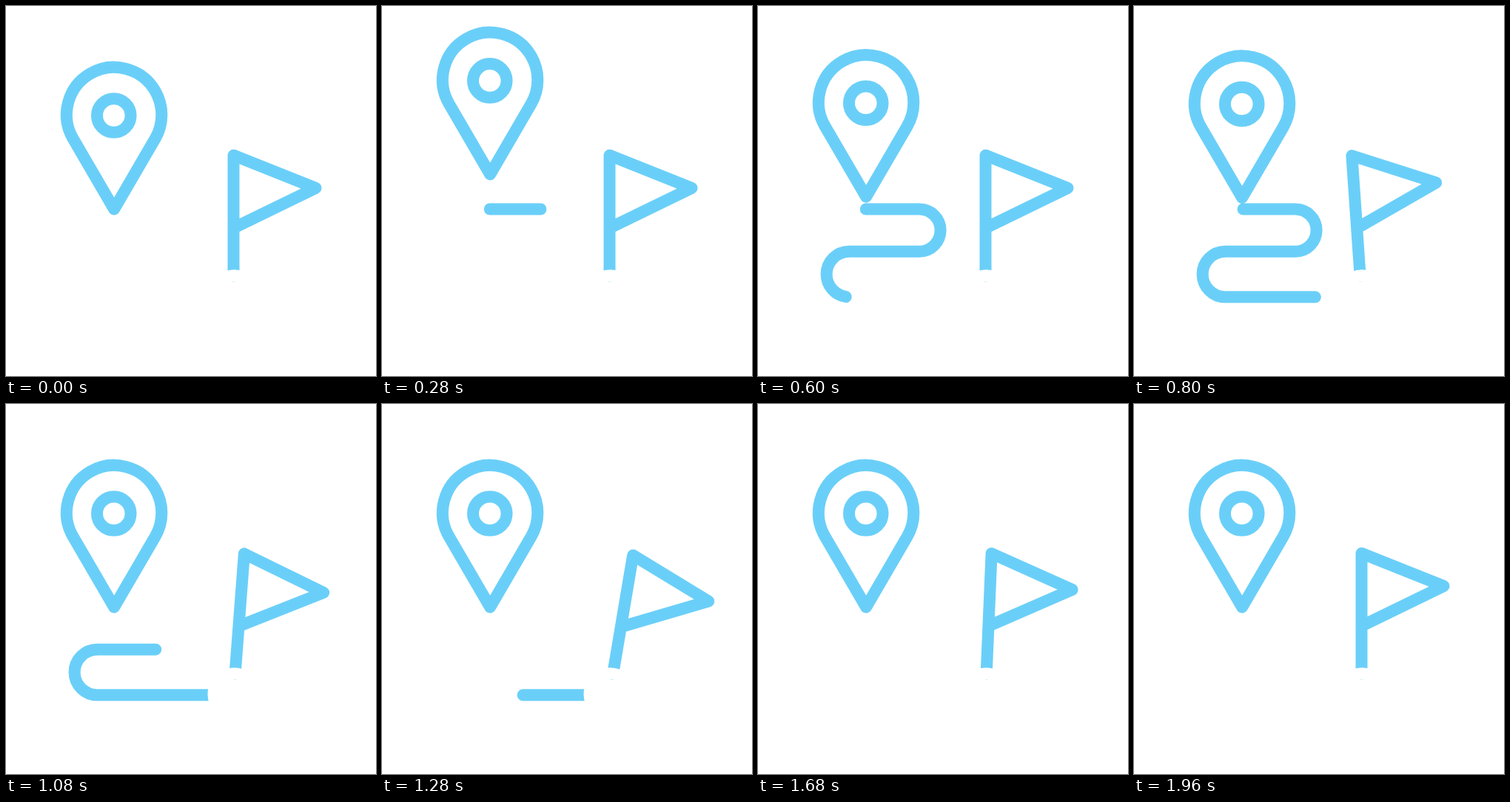
Write an HTML page with a canvas that moves like this. It is 500 px wide and 500 px high and loops after 5 s.

```html
<!DOCTYPE html>
<html lang="en">
<head>
<meta charset="utf-8">
<title>Route</title>
<style>
  html, body { margin: 0; width: 100%; height: 100%; overflow: hidden; background: #fff; }
  canvas { display: block; width: 500px; height: 500px; }
</style>
</head>
<body>
<canvas id="stage"></canvas>
<script>
const LOOP = 5000, STEP = 40, LAST = 1960;
const BLUE = '#6acff8', WHITE = '#fff';
const canvas = document.getElementById('stage');
const ctx = canvas.getContext('2d');
const scale = window.devicePixelRatio || 1;
canvas.width = canvas.height = 500 * scale;

// Cubic easing through (0,0) and (1,1), solved by bisection.
function bezier(x1, y1, x2, y2) {
  const at = (p, a, b) => 3 * p * (1 - p) * ((1 - p) * a + p * b) + p * p * p;
  return u => {
    if (u <= 0) return 0;
    if (u >= 1) return 1;
    let lo = 0, hi = 1;
    for (let i = 0; i < 30; i++) {
      const mid = (lo + hi) / 2;
      if (at(mid, x1, x2) < u) lo = mid; else hi = mid;
    }
    return at(lo, y1, y2);
  };
}
const smooth = bezier(0.5, 0, 0.5, 1);
const drop = bezier(0.5, 0, 1, 1);

// Keys are [time, value, easing into this key].
function track(keys, t) {
  if (t <= keys[0][0]) return keys[0][1];
  for (let i = 1; i < keys.length; i++) {
    const [t0, v0] = keys[i - 1];
    const [t1, v1, ease = smooth] = keys[i];
    if (t < t1) return v0 + (v1 - v0) * ease((t - t0) / (t1 - t0));
  }
  return keys[keys.length - 1][1];
}

const HOP = [[0, 0], [333, -49], [667, 0, drop], [833, -16.5], [1000, 0, drop]];
const SWING = [[667, 0], [933, -7.9], [1200, 12.5], [1467, -5.8], [1733, 3], [LAST, 0]];
const HEAD = [[0, 0], [1007, 1]];
const TAIL = [[762, 0], [1515, 1]];

// Pin: a circle with tangents meeting at the tip.
const pin = new Path2D();
const PIN = { x: 146.1, y: 147, r: 64.2, tip: 274.5 };
const lean = Math.asin(PIN.r / (PIN.tip - PIN.y));
pin.moveTo(PIN.x, PIN.tip);
pin.arc(PIN.x, PIN.y, PIN.r, Math.PI - lean, lean);
pin.closePath();
const eye = new Path2D();
eye.arc(145.75, 148, 22.8, 0, 2 * Math.PI);

// Winding route.
const R1 = 28.6, R2 = 30.8, Y = 274.5;
const ROUTE = { start: 145.75, right: 218, left: 123.4, end: 279.5 };
const midY = Y + 2 * R1, lowY = midY + 2 * R2;
const route = new Path2D();
route.moveTo(ROUTE.start, Y);
route.lineTo(ROUTE.right, Y);
route.arc(ROUTE.right, Y + R1, R1, -Math.PI / 2, Math.PI / 2);
route.lineTo(ROUTE.left, midY);
route.arc(ROUTE.left, midY + R2, R2, -Math.PI / 2, Math.PI / 2, true);
route.lineTo(ROUTE.end, lowY);
const routeLength = 2 * (ROUTE.right - ROUTE.left) + ROUTE.end - ROUTE.start
  + Math.PI * (R1 + R2);

// Flag and the white ring around its foot.
const FOOT = { x: 307.5, y: 392 };
const flag = new Path2D();
flag.moveTo(FOOT.x, 364.5);
flag.lineTo(FOOT.x, 201.8);
flag.lineTo(418.5, 246);
flag.lineTo(FOOT.x, 300);
const ring = new Path2D();
ring.arc(308.2, FOOT.y, 27.75, 0, 2 * Math.PI);

function drawRoute(t) {
  const head = track(HEAD, t) * routeLength;
  const tail = track(TAIL, t) * routeLength;
  if (head - tail < 0.01) return;
  ctx.save();
  ctx.setLineDash([head - tail, 2 * routeLength]);
  ctx.lineDashOffset = -tail;
  ctx.stroke(route);
  ctx.restore();
}

function drawPin(t) {
  ctx.save();
  ctx.translate(0, track(HOP, t));
  ctx.stroke(pin);
  ctx.stroke(eye);
  ctx.restore();
}

function drawFlag(t) {
  ctx.save();
  ctx.translate(FOOT.x, FOOT.y);
  ctx.rotate(track(SWING, t) * Math.PI / 180);
  ctx.translate(-FOOT.x, -FOOT.y);
  ctx.stroke(flag);
  ctx.restore();
}

function draw(t) {
  ctx.setTransform(scale, 0, 0, scale, 0, 0);
  ctx.fillStyle = WHITE;
  ctx.fillRect(0, 0, 500, 500);
  ctx.lineWidth = 16;
  ctx.lineCap = ctx.lineJoin = 'round';
  ctx.strokeStyle = BLUE;
  drawRoute(t);
  drawPin(t);
  drawFlag(t);
  ctx.strokeStyle = WHITE;
  ctx.stroke(ring);
}

const began = performance.now();
function tick() {
  const t = (performance.now() - began) % LOOP;
  draw(Math.min(Math.floor(t / STEP) * STEP, LAST));
  requestAnimationFrame(tick);
}
tick();
</script>
</body>
</html>
```
